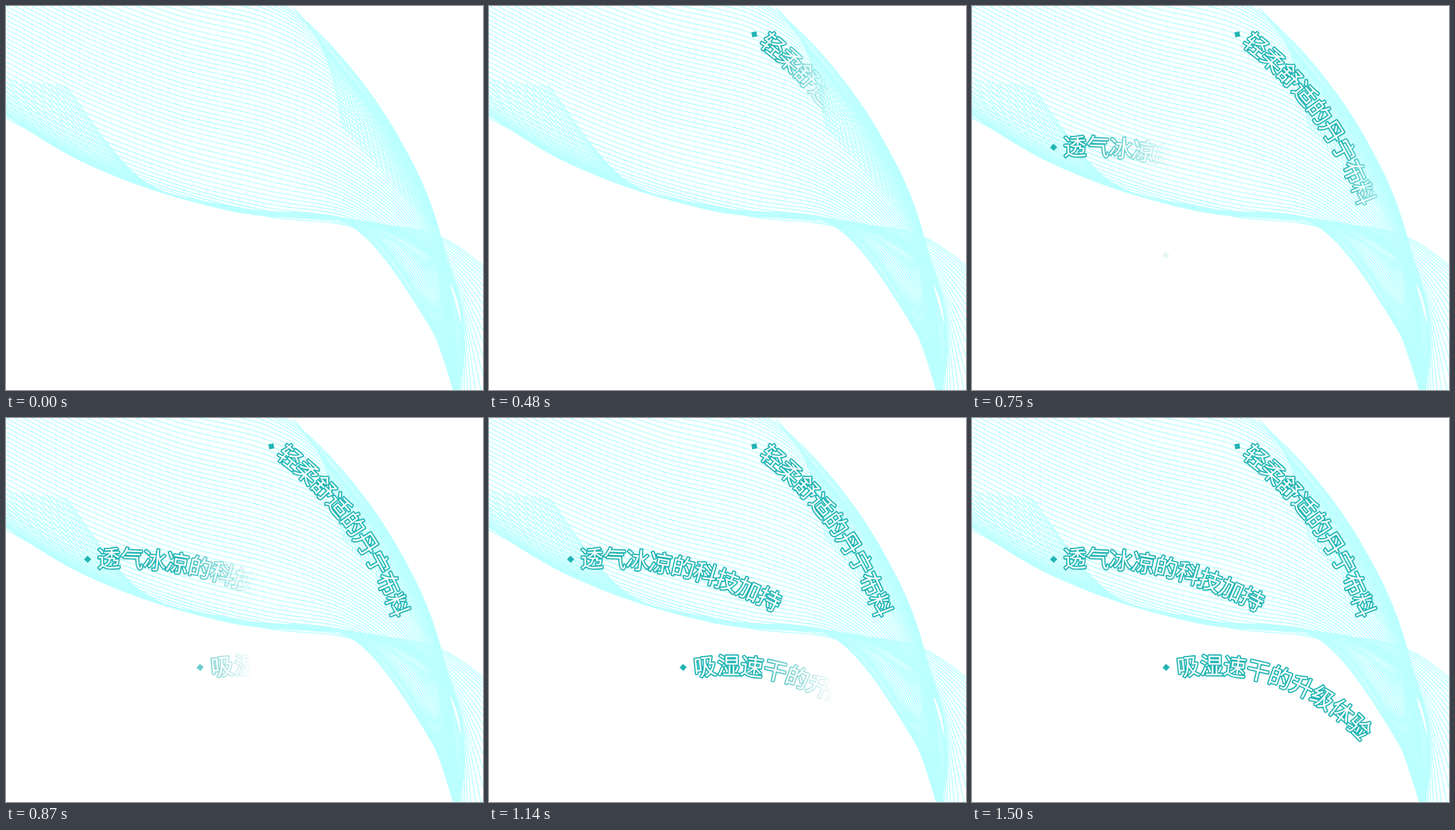
Write an HTML page with a canvas that moves like this. It is 640 px wide and 515 px high and loops after 3770 ms.

```html
<!DOCTYPE html>
<html lang="zh-CN">
<head>
<meta charset="utf-8">
<style>
  html, body { margin: 0; width: 100%; height: 100%; overflow: hidden; background: #fff; }
  canvas { position: absolute; left: 0; top: 0; }
</style>
</head>
<body>
<script>
const W = 640, H = 515, LOOP = 3770, STEP = 30, SOFT = 0.37;
const TEAL = '#22b4b4', PALE = '#bbffff';

function layer() {
  const c = document.createElement('canvas');
  c.width = W;
  c.height = H;
  document.body.append(c);
  return c.getContext('2d');
}

const clamp = (v, lo, hi) => Math.max(lo, Math.min(hi, v));
const at = (list, i) => list[clamp(i, 0, list.length - 1)];

// Catmull-Rom value between b and c
const spline = (a, b, c, d, u) =>
  b + u / 2 * (c - a + u * (2 * a - 5 * b + 4 * c - d + u * (3 * (b - c) + d - a)));

function strand(g, points) {
  g.beginPath();
  g.moveTo(...points[0]);
  for (let i = 0; i < points.length - 1; i++) {
    const [a, b, c, d] = [-1, 0, 1, 2].map(k => at(points, i + k));
    g.bezierCurveTo(b[0] + (c[0] - a[0]) / 6, b[1] + (c[1] - a[1]) / 6,
                    c[0] - (d[0] - b[0]) / 6, c[1] - (d[1] - b[1]) / 6, ...c);
  }
  g.stroke();
}

// Fills the space between key curves with n strands
function blend(g, n, ...keys) {
  for (let i = 0; i < n; i++) {
    const t = i / (n - 1) * (keys.length - 1);
    const k = Math.min(keys.length - 2, Math.floor(t));
    const mix = (j, axis) =>
      spline(...[-1, 0, 1, 2].map(m => at(keys, k + m)[j][axis]), t - k);
    strand(g, keys[k].map((_, j) => [mix(j, 0), mix(j, 1)]));
  }
}

// Every body strand rises to the left along the same parabola
const body = (y, ...rest) => [
  ...[360, 240, 120, 0].map(d => [350 - d, y - 0.19 * d - 0.00053 * d * d]), ...rest];

function drawRibbon() {
  const g = layer();
  g.strokeStyle = PALE;
  g.lineWidth = 1.4;
  blend(g, 50,
    body(282, [470, 298], [530, 355], [575, 440], [602, 520]),
    body(185, [445, 222], [528, 280], [583, 370], [607, 520]),
    body(85, [443, 125], [520, 205], [586, 325], [609, 520]),
    body(-12, [430, 47], [520, 165], [583, 311], [606, 520]));
  // fold along the lower edge
  blend(g, 26,
    [[80, 107], [185, 235], [320, 272], [465, 296], [575, 440], [602, 520]],
    [[-80, 90], [100, 207], [300, 274], [540, 304], [611, 430], [606, 520]]);
  // fold at the upper right
  blend(g, 22,
    [[385, 2], [415, 38], [437, 90], [453, 165]],
    [[520, 165], [553, 230], [571, 272], [583, 311]]);
  // fan at the lower right
  blend(g, 24,
    [[465, 291], [590, 313], [720, 420]],
    [[583, 311], [612, 420], [600, 560]]);
}

const lines = [
  { text: '轻柔舒适的丹宁布料', dot: [356, 38, 35], x: 381, y: 52, from: 39, to: 69,
    gap: 31.1, left: 352, width: 192, start: 210, time: 660 },
  { text: '透气冰凉的科技加持', dot: [109.5, 189.5, -4], x: 138, y: 188, from: -1.5, to: 27.5,
    gap: 30.9, left: 105, width: 288, start: 480, time: 660 },
  { text: '吸湿速干的升级体验', dot: [260.5, 334.5, -5], x: 290, y: 333, from: -6, to: 45,
    gap: 31.5, left: 257, width: 279, start: 720, time: 780 }
];

function place(g, x, y, deg, draw) {
  g.save();
  g.translate(x, y);
  g.rotate(deg * Math.PI / 180);
  draw();
  g.restore();
}

function drawLine(line) {
  const g = layer();
  g.font = '31px "Noto Sans CJK SC", "Noto Sans CJK", sans-serif';
  g.textAlign = 'center';
  g.lineJoin = 'round';
  g.lineWidth = 3.3;
  g.strokeStyle = g.fillStyle = TEAL;
  const [dx, dy, tilt] = line.dot;
  place(g, dx, dy, tilt + 45, () => g.fillRect(-3.4, -3.4, 6.8, 6.8));
  g.fillStyle = '#fff';
  const chars = [...line.text];
  const turn = (line.to - line.from) / (chars.length - 1);
  let { x, y } = line;
  chars.forEach((ch, i) => {
    const deg = line.from + turn * i;
    place(g, x, y, deg, () => {
      g.strokeText(ch, 0, 11.8);
      g.fillText(ch, 0, 11.8);
    });
    const dir = (deg + turn / 2) * Math.PI / 180;
    x += line.gap * Math.cos(dir);
    y += line.gap * Math.sin(dir);
  });
  line.style = g.canvas.style;
}

// Soft-edged wipe from left to right
function frame(now) {
  const t = Math.floor(now % LOOP / STEP) * STEP;
  for (const { style, left, width, start, time } of lines) {
    const u = clamp((t - start) / time, 0, 1);
    const head = left + u * width * (1 + SOFT);
    style.visibility = u > 0 ? 'visible' : 'hidden';
    style.webkitMaskImage = u < 1
      ? `linear-gradient(90deg, #000 ${head - width * SOFT}px, transparent ${head}px)` : 'none';
  }
}

drawRibbon();
lines.forEach(drawLine);
const begin = performance.now();
function tick() {
  frame(performance.now() - begin);
  requestAnimationFrame(tick);
}
tick();
</script>
</body>
</html>
```
